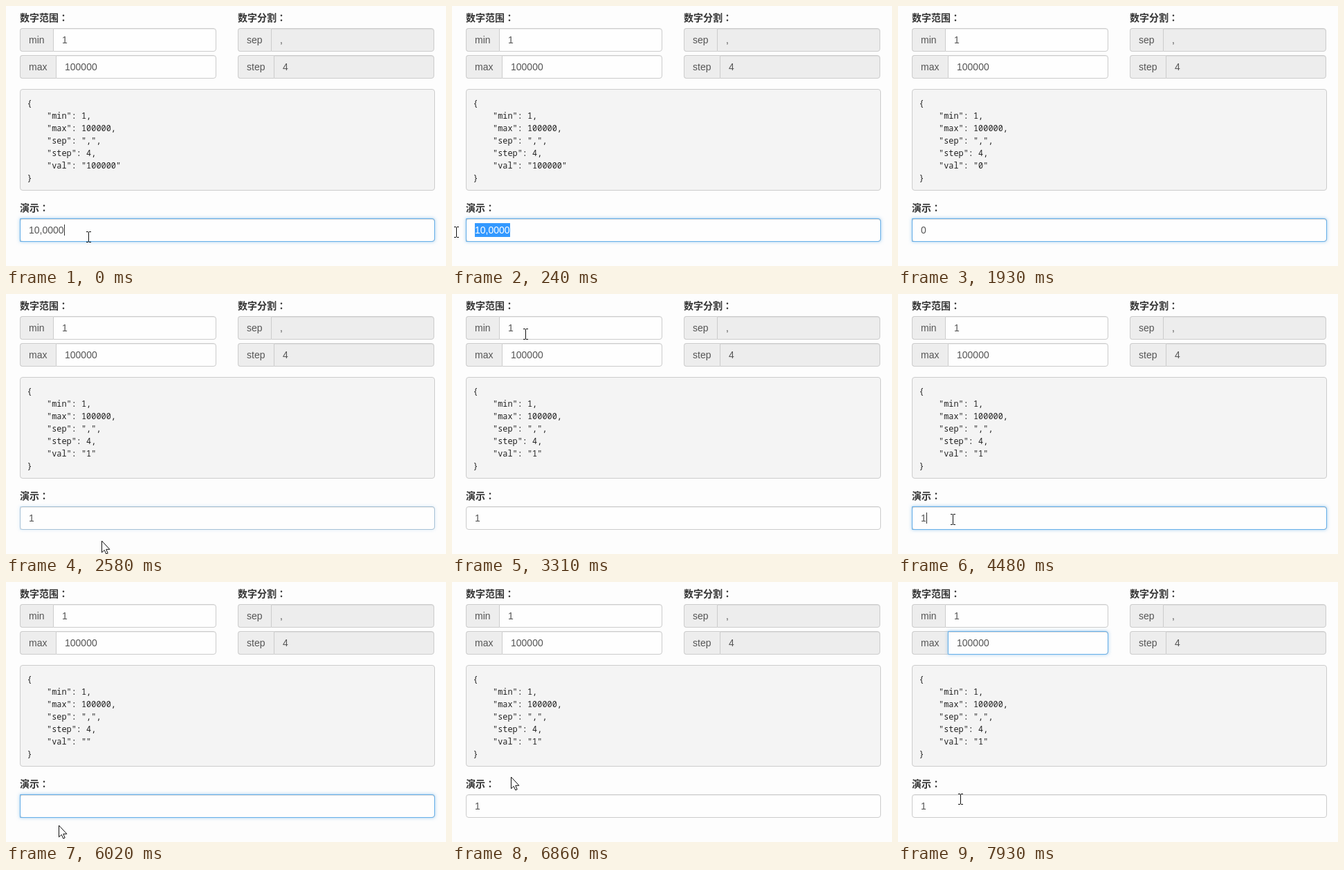
An HTML page that plays this animation: 636 by 376 pixels, repeating every 8000 ms.

```html
<!DOCTYPE html>
<html lang="zh-CN">
<head>
<meta charset="utf-8">
<title>数字输入演示</title>
<style>
html, body { margin: 0; width: 100%; height: 100%; overflow: hidden; background: #fdfdfd; }
#stage {
  position: relative; width: 636px; height: 376px; overflow: hidden;
  background: #fdfdfd; color: #333; cursor: default;
  font: 14px/20px "Liberation Sans", Arial, sans-serif;
}
#stage div, pre, #cursor { position: absolute; box-sizing: border-box; }
.label { font: bold 14px/20px "Noto Sans CJK SC", "Noto Sans CJK", sans-serif; white-space: nowrap; }
.label span { font-family: "Noto Sans CJK TC", "Noto Sans CJK", sans-serif; }
.addon, .input {
  height: 34px; padding: 6px 12px; border: 1px solid #ccc;
  color: #555; white-space: pre;
}
.addon { background: #ededed; border-right: 0; border-radius: 4px 0 0 4px; }
.input { background: #fefefe; border-radius: 0 4px 4px 0; box-shadow: inset 0 1px 1px rgba(0,0,0,.075); }
.input.off { background: #ededed; }
#demo, #demo .glow { border-radius: 4px; }
#stage .glow {
  inset: -1px; opacity: 0; border: 1px solid #66afe9; border-radius: 0 4px 4px 0;
  box-shadow: inset 0 1px 1px rgba(0,0,0,.075), 0 0 5px rgba(102,175,233,.6);
}
.sel { display: inline-block; height: 20px; background: #3399ff; color: #fff; }
.caret { position: absolute; width: 1px; height: 16px; margin-top: 2px; background: #333; }
pre {
  left: 20px; top: 120px; width: 600px; height: 147px; margin: 0; padding: 9.5px;
  border: 1px solid #ccc; border-radius: 4px; background: #f4f4f4; color: #222;
  font: 11.9px/18px "Noto Sans Mono", "DejaVu Sans Mono", monospace;
}
#cursor { left: 0; top: 0; width: 24px; height: 24px; overflow: visible; pointer-events: none; }
</style>
</head>
<body>
<div id="stage">
  <div class="label" style="left:20px;top:6px">数字范围<span lang="zh-TW">：</span></div>
  <div class="label" style="left:335px;top:6px">数字分割<span lang="zh-TW">：</span></div>
  <div class="label" style="left:20px;top:281px">演示<span lang="zh-TW">：</span></div>

  <div class="addon" style="left:20px;top:32px;width:48px">min</div>
  <div class="input" style="left:68px;top:32px;width:236px">1</div>
  <div class="addon" style="left:20px;top:71px;width:52px">max</div>
  <div class="input" id="max" style="left:72px;top:71px;width:232px"><div class="glow"></div><span>100000</span><span class="caret"></span></div>

  <div class="addon" style="left:335px;top:32px;width:48px">sep</div>
  <div class="input off" style="left:383px;top:32px;width:236px">,</div>
  <div class="addon" style="left:335px;top:71px;width:52px">step</div>
  <div class="input off" style="left:387px;top:71px;width:232px">4</div>

  <pre id="json"></pre>

  <div class="input" id="demo" style="left:20px;top:307px;width:600px"><div class="glow"></div><span id="plain"></span><span class="sel" id="sel"></span><span class="caret"></span></div>

  <svg id="cursor" shape-rendering="crispEdges">
    <path id="beam" fill="#111" d="M-3-7h3v1h-3zM1-7h3v1h-3zM0-6h1v14h-1zM-3 8h3v1h-3zM1 8h3v1h-3z"/>
    <path id="arrow" shape-rendering="auto" fill="#fff" stroke="#111"
      d="M.5 0V16.8L4.3 13.4 6.8 19 9.2 18 6.8 12.3H11.9Z"/>
  </svg>
</div>
<script>
const LOOP = 8000, FADE = 120, BLINK = 490;
const DRAG = 20, TYPE = 1180, LEAVE = 1850, BLUR = 2510, FOCUS = 4350, ERASE = 5280, BLUR_EMPTY = 6190;
const $ = s => document.querySelector(s);

// Contents of the demo field after each edit
const edits = [[0, "10,0000"], [TYPE, "0"], [BLUR, "1"], [ERASE, ""], [BLUR_EMPTY, "1"]];

// Which field has the focus, from when to when
const sessions = [["demo", -FADE, BLUR], ["demo", FOCUS, BLUR_EMPTY], ["max", 7440, LOOP]];

// Pointer glides: start, end, x, y; it rests in between
const home = [119, 333];
const glides = [
  [DRAG, 240, 6, 326], [LEAVE, 1930, 140, 420], [2180, 2310, 138, 357],
  [2850, 3310, 106, 57], [3310, 3440, 86, 46], [3590, 4180, 79, 325],
  [5750, 6020, 76, 352], [6380, 6670, 84, 315], [6850, 6860, 85, 282],
  [6910, 7310, 137, 86], [7580, 7925, 90, 313]
];

const clamp = (v, a, b) => Math.min(b, Math.max(a, v));
const progress = (t, from, to) => clamp((t - from) / (to - from), 0, 1);
const smooth = k => k * k * (3 - 2 * k);
const show = (el, on) => { el.style.display = on ? "" : "none"; };

function setText(el, text) {
  if (el.textContent !== text) el.textContent = text;
}

function pointerAt(t) {
  let [x, y] = home;
  for (const [from, to, nx, ny] of glides) {
    const k = progress(t, from, to);
    x += (nx - x) * k;
    y += (ny - y) * k;
  }
  return [Math.round(x), Math.round(y)];
}

function drawFocus(id, t, edited, selecting) {
  let glow = 0, caret = false;
  for (const [field, from, to] of sessions) {
    if (field !== id) continue;
    glow += smooth(progress(t, from, from + FADE)) - smooth(progress(t, to, to + FADE));
    if (t >= from && t < to) caret = Math.floor((t - Math.max(from, edited)) / BLINK) % 2 === 0;
  }
  $(`#${id} .glow`).style.opacity = glow;
  show($(`#${id} .caret`), caret && !selecting);
}

function draw(t) {
  const [edited, text] = edits.findLast(e => e[0] <= t);
  const [x, y] = pointerAt(t);

  const selecting = t >= DRAG && t < TYPE;
  const kept = selecting ? clamp(Math.round((x - 33) / 7.3), 0, text.length) : text.length;
  setText($("#plain"), text.slice(0, kept));
  setText($("#sel"), text.slice(kept));
  show($("#sel"), kept < text.length);

  const val = text.replace(",", "");
  setText($("#json"), JSON.stringify({ min: 1, max: 100000, sep: ",", step: 4, val }, null, 4));

  drawFocus("demo", t, edited, selecting);
  drawFocus("max", t, edited, false);

  const beam = t < LEAVE || !!document.elementFromPoint(x, y)?.closest(".input, pre");
  show($("#beam"), beam);
  show($("#arrow"), !beam);
  $("#cursor").style.transform = `translate(${x}px, ${y}px)`;
}

const start = performance.now();
function tick() {
  draw((performance.now() - start) % LOOP);
  requestAnimationFrame(tick);
}
tick();
</script>
</body>
</html>
```
